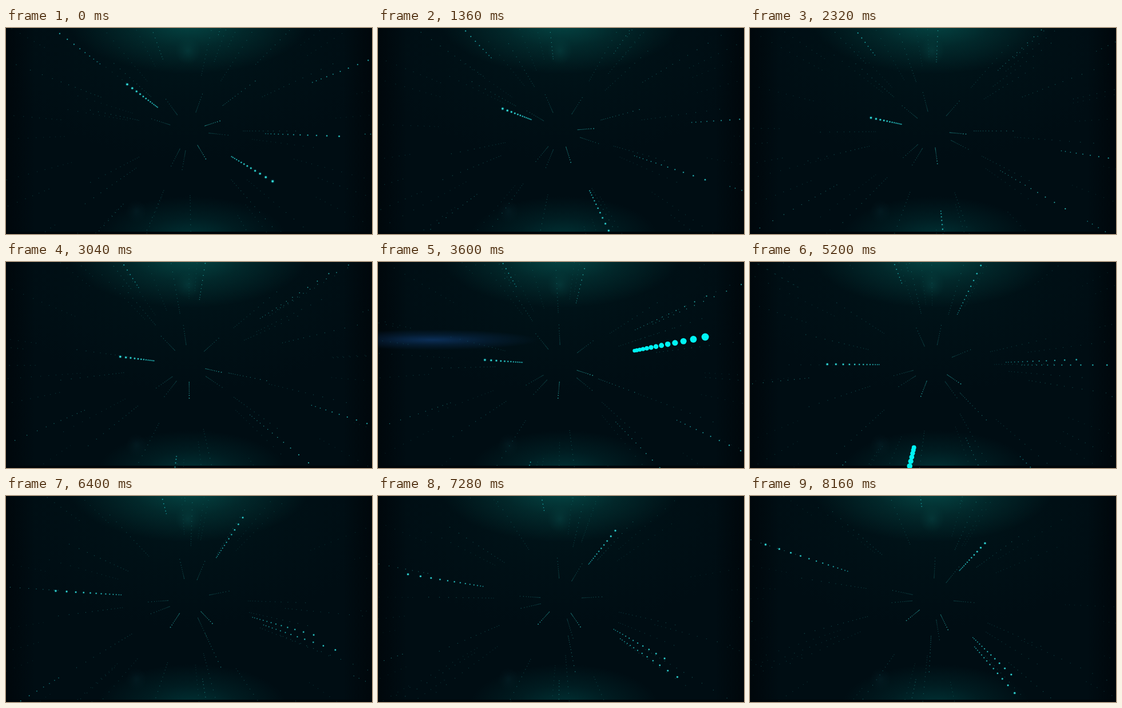
Write an HTML page with a canvas that moves like this. It is 640 px wide and 360 px high and loops after 8240 ms.

```html
<!DOCTYPE html>
<html lang="en">
<head>
<meta charset="utf-8">
<title>Dotted light tunnel</title>
<style>
html, body { margin: 0; width: 100%; height: 100%; overflow: hidden; background: #000d13; }
canvas { display: block; width: 640px; height: 360px; }
</style>
</head>
<body>
<canvas id="stage" width="640" height="360"></canvas>
<script>
const ctx = document.getElementById('stage').getContext('2d');
const LOOP = 8240, STEP = 80, LAST = LOOP - STEP;
const CX = 320, CY = 180, DOTS = 13, TAU = Math.PI * 2;

let seed = 41;
function rand() {
  seed = (seed * 16807) % 2147483647;
  return seed / 2147483647;
}

// A ray drifts through polar points [degrees, radius] evenly spaced in time.
const rays = [];
function addRay(from, to, ...points) {
  rays.push({ from, to, points });
}

// A ring of rays turns at one common rate.
function addRing(angles, radius, turn, level) {
  for (const a of angles) addRay(level, level, [a, radius], [a + turn, radius * 1.05]);
}

addRay(1.05, .9, [217, 69], [189, 59], [180.6, 99], [198, 157]);
addRay(1.15, .6, [31, 87], [92, 152], [135.5, 236], [173, 319]);
addRay(.8, .8, [-143, 195], [-117, 156], [-97, 163]);
addRay(.5, .85, [-73, 176], [-18.5, 139], [44, 97]);
addRay(.4, .9, [-72, 215], [-17, 170], [49, 111]);
addRay(.5, .9, [-110, 134], [-72.5, 108], [-47, 68]);
addRay(.8, .75, [-21.5, 232], [85, 215]);
addRay(.75, .5, [2, 134], [102, 144]);
addRay(.8, .7, [1, 308], [104, 325]);
addRay(.5, .6, [132, 172], [198, 245]);
addRay(.35, .75, [-55, 318], [47, 318]);
addRay(.45, .45, [-37, 74], [93, 65]);

addRing([-18, 59], 29, 82, .55);
addRing([-70, 6, 100, 117, 198, 234], 35, 75, .32);
addRing([49, 89, 113, 145], 113, 76, .32);
addRing([192, 222], 90, 102, .32);
addRing([-45, 201], 165, 85, .36);

for (let i = 0; i < 46; i++) {
  const a = i * 137.5, radius = 95 + 210 * rand();
  addRing([a], radius, 80 + 40 * rand(), .16 + .14 * rand());
}

// Short bursts of large dots.
const bursts = [
  { at: 3600, angle: -11, radius: 131, size: 3.3, flare: true },
  { at: 5200, angle: 103, radius: 148, size: 3.9, flare: false }
];

// Smooth curve through all points, u running from 0 to 1.
function along(points, u) {
  const n = points.length - 1;
  const sum = [0, 0];
  points.forEach((p, i) => {
    let w = 1;
    for (let j = 0; j <= n; j++) if (j !== i) w *= (u * n - j) / (i - j);
    sum[0] += w * p[0];
    sum[1] += w * p[1];
  });
  return sum;
}

function disc(x, y, r) {
  ctx.beginPath();
  ctx.arc(x, y, r, 0, TAU);
  ctx.fill();
}

// Visits the dots of a ray from its far end towards the viewer.
function eachDot(degrees, radius, draw) {
  const a = degrees * TAU / 360;
  for (let k = 0; k < DOTS; k++) {
    const near = k / (DOTS - 1);
    const s = 1 / (1 - .49 * Math.pow(near, 1.12));
    draw(CX + radius * s * Math.cos(a), CY + radius * s * Math.sin(a), s, near);
  }
}

function drawRay(ray, u) {
  const level = ray.from + (ray.to - ray.from) * u;
  const [degrees, radius] = along(ray.points, u);
  eachDot(degrees, radius, (x, y, s, near) => {
    const r = Math.max(.65, .86 * level * s);
    const alpha = Math.min(1, level * 1.15) * (.7 + .3 * near);
    if (level > .7) {
      ctx.fillStyle = `rgba(0,150,170,${alpha * .25})`;
      disc(x, y, r * 1.7);
    }
    ctx.fillStyle = `rgba(55,224,218,${alpha})`;
    disc(x, y, r);
  });
}

function drawBurst(b, t) {
  const power = 1 - Math.abs(t - b.at) / 320;
  if (power <= 0) return;
  if (b.flare) glow(95, 136, 185, 18, '18,66,128', .62 * power);
  ctx.fillStyle = '#00f4f4';
  eachDot(b.angle + (t - b.at) * .013, b.radius, (x, y, s) => disc(x, y, b.size * s * power));
}

function glow(x, y, rx, ry, rgb, alpha) {
  ctx.save();
  ctx.translate(x, y);
  ctx.scale(rx, ry);
  const g = ctx.createRadialGradient(0, 0, 0, 0, 0, 1);
  g.addColorStop(0, `rgba(${rgb},${alpha})`);
  g.addColorStop(.5, `rgba(${rgb},${alpha * .4})`);
  g.addColorStop(1, `rgba(${rgb},0)`);
  ctx.fillStyle = g;
  ctx.fillRect(-1, -1, 2, 2);
  ctx.restore();
}

function backdrop() {
  ctx.fillStyle = '#000d13';
  ctx.fillRect(0, 0, 640, 360);
  glow(320, 30, 340, 200, '0,30,34', .45);
  glow(320, -12, 210, 92, '6,88,84', .75);
  glow(318, 40, 22, 24, '10,80,78', .35);
  glow(325, 366, 165, 72, '0,62,64', .75);
  glow(228, 320, 18, 20, '10,50,58', .25);
  const g = ctx.createLinearGradient(0, 0, 640, 0);
  g.addColorStop(0, 'rgba(0,3,6,.6)');
  g.addColorStop(.08, 'rgba(0,3,6,0)');
  g.addColorStop(.92, 'rgba(0,3,6,0)');
  g.addColorStop(1, 'rgba(0,3,6,.6)');
  ctx.fillStyle = g;
  ctx.fillRect(0, 0, 640, 360);
  ctx.fillStyle = '#00060a';
  ctx.fillRect(0, 356, 640, 4);
}

function render(t) {
  backdrop();
  for (const ray of rays) drawRay(ray, t / LAST);
  for (const b of bursts) drawBurst(b, t);
}

const start = performance.now();
function tick() {
  const t = (performance.now() - start) % LOOP;
  render(Math.floor(t / STEP) * STEP);
  requestAnimationFrame(tick);
}
tick();
</script>
</body>
</html>
```
